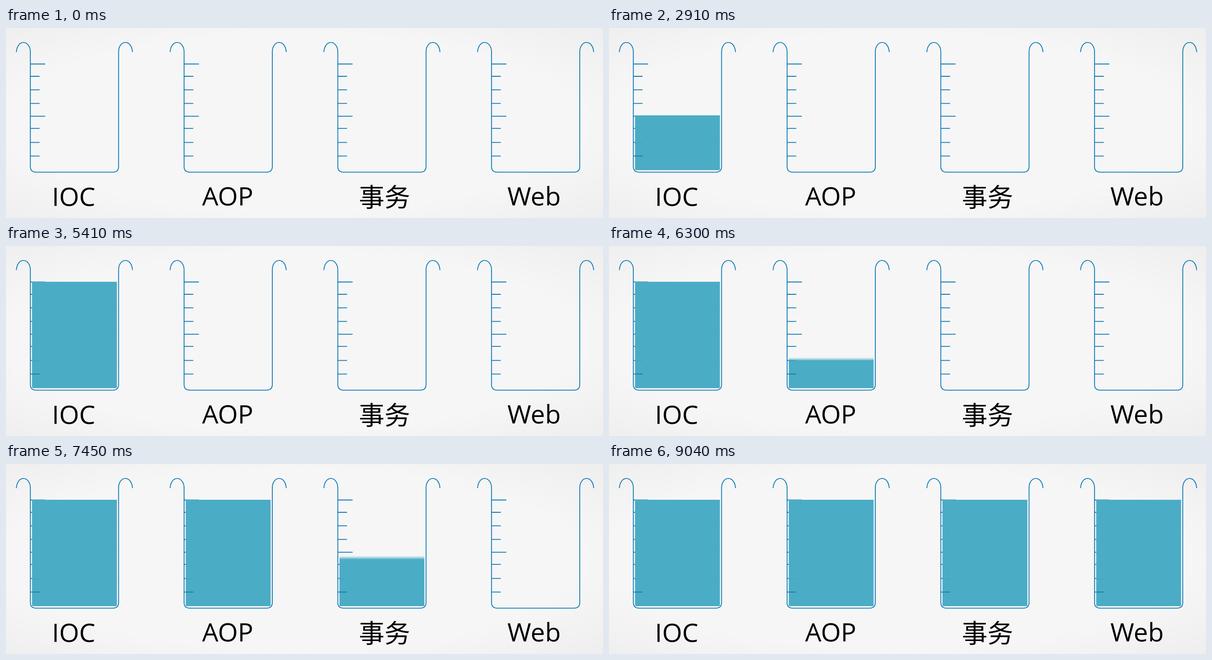
Animation, 1280 px wide and 409 px high, one loop 9.5 s. Source, as an HTML page:

```html
<!DOCTYPE html>
<html lang="zh-CN">
<head>
<meta charset="utf-8">
<title>Beakers</title>
<style>
  html, body { margin: 0; width: 100%; height: 100%; overflow: hidden; }
  body { background: radial-gradient(ellipse farthest-corner at 48% 50%, #f6f6f6 66%, #eeeeee 100%); }
  svg { display: block; width: 1280px; height: 409px; }
  .glass { fill: none; stroke: #0f7ab5; stroke-width: 1.8; }
  text { font: 55px "Open Sans", "Noto Sans CJK SC", "Noto Sans CJK", sans-serif; fill: #000; }
  .han { font-family: "Noto Sans CJK SC", "Noto Sans CJK", sans-serif; }
</style>
</head>
<body>
<svg id="stage" viewBox="0 0 1280 409">
  <defs>
    <g id="beaker" class="glass">
      <path d="M22.2 52C23 40 29 31.2 37.3 31.2S52.2 40 52.2 51V298Q52.2 310.3 64.5 310.3H229Q241.4 310.3 241.4 298V51C241.4 40 247.5 31.2 256 31.2S270.5 40 271.3 52"/>
      <path d="M52 77.5h32M52 104h20M52 133.2h20M52 162.4h20M52 189.8h32M52 216.2h20M52 246.3h20M52 275.6h20"/>
    </g>
  </defs>
  <g id="beakers"></g>
  <text x="98.6" y="383">IOC</text>
  <text x="420.5" y="382">AOP</text>
  <text class="han" x="756.5" y="383.5">事务</text>
  <text x="1075" y="382">Web</text>
</svg>
<script>
const LOOP = 9500;
const SOFT = 8;          // height of the feathered wipe edge
const SPACING = 329.6;
const LEFT = 55.8, RIGHT = 237.8;

// Liquid layers from the bottom up: [top, bottom, corner radius]
const LAYERS = [[246, 306, 2], [188, 247, 0], [134, 188.5, 0], [77, 134.5, 0]];

// Per beaker: start of each layer's wipe and its duration
const STEP = 248.5;
const inTurn = start => LAYERS.map((_, i) => start + i * STEP);
const FILLS = [
  { starts: [1100, 2405, 3705, 4905], length: 500 },
  { starts: inTurn(6026), length: STEP },
  { starts: inTurn(7020), length: STEP },
  { starts: inTurn(8014), length: STEP }
];

function add(parent, tag, attrs) {
  const el = document.createElementNS("http://www.w3.org/2000/svg", tag);
  for (const key in attrs) el.setAttribute(key, attrs[key]);
  parent.appendChild(el);
  return el;
}

function addLayer(parent, id, [top, bottom, r]) {
  const gradient = add(parent, "linearGradient", {
    id, gradientUnits: "userSpaceOnUse", x1: 0, x2: 0
  });
  add(gradient, "stop", { offset: 0, "stop-color": "#4bacc6", "stop-opacity": 0 });
  add(gradient, "stop", { offset: 1, "stop-color": "#4bacc6" });
  add(parent, "path", {
    fill: `url(#${id})`,
    d: `M${LEFT} ${top}H${RIGHT}V${bottom - r}q0 ${r} ${-r} ${r}H${LEFT + r}q${-r} 0 ${-r} ${-r}Z`
  });
  return gradient;
}

const wipes = [];
FILLS.forEach(({ starts, length }, b) => {
  const group = add(document.getElementById("beakers"), "g", {
    transform: `translate(${b * SPACING} 0)`
  });
  LAYERS.forEach((layer, i) => {
    const gradient = addLayer(group, `liquid${b}-${i}`, layer);
    wipes.push({ gradient, top: layer[0], bottom: layer[1], start: starts[i], length });
    // The glass sits above the lowest layer only
    if (i === 0) add(group, "use", { href: "#beaker" });
  });
});

function draw(time) {
  for (const { gradient, top, bottom, start, length } of wipes) {
    const p = Math.min(1, Math.max(0, (time - start) / length));
    const edge = bottom - (bottom - top + SOFT) * p;
    gradient.setAttribute("y1", edge);
    gradient.setAttribute("y2", edge + SOFT);
  }
}

const origin = performance.now();
function tick() {
  draw((performance.now() - origin) % LOOP);
  requestAnimationFrame(tick);
}
tick();
</script>
</body>
</html>
```
